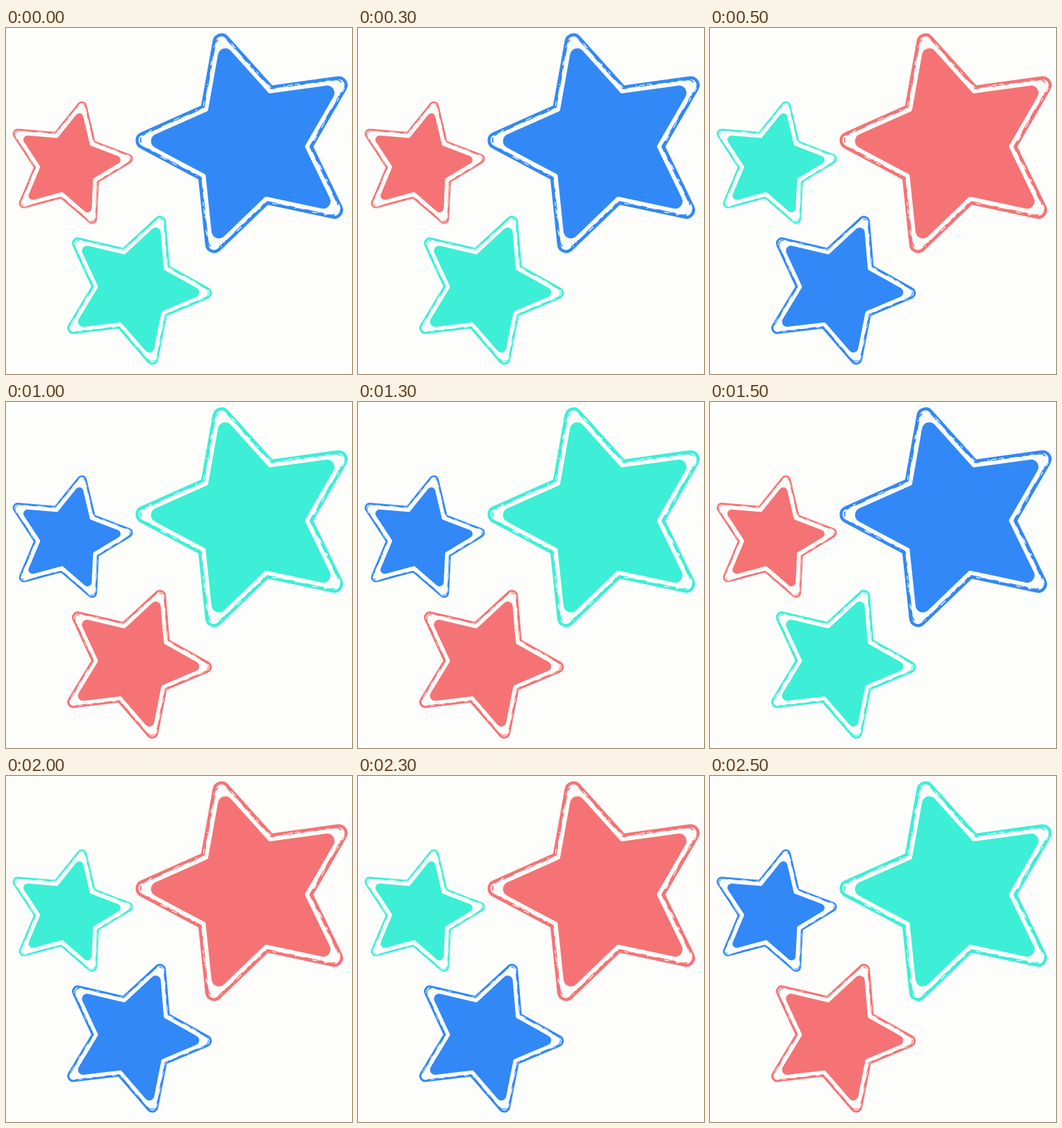
Recreate the animation shown at these times as an HTML page with a canvas. Size 498 px wide and 498 px high, loop 3 s.

```html
<!DOCTYPE html>
<html lang="en">
<head>
<meta charset="utf-8">
<title>Three stars</title>
<style>
  html, body { margin: 0; height: 100%; overflow: hidden; background: #fdfefc; }
  canvas { display: block; }
</style>
</head>
<body>
<canvas width="498" height="498"></canvas>
<script>
const ctx = document.querySelector('canvas').getContext('2d');
const PAPER = '#fdfefc';
const COLORS = ['#3288f6', '#f57375', '#3cefd6'];
const STEP = 500;
const NOTCH = 0.497; // notch radius relative to tip radius

// outer and inner are the tip radii before rounding
const STARS = [
  { x: 352, y: 167.5, outer: 177, inner: 157, tilt: 182.1 },
  { x: 90.2, y: 196, outer: 99, inner: 82.5, tilt: -5.2 },
  { x: 184, y: 375.6, outer: 120, inner: 103.5, tilt: 3.2 },
];

function seededRandom(seed) {
  return () => (seed = seed * 16807 % 2147483647) / 2147483647;
}

function starPath(radius, corner) {
  const path = new Path2D();
  const point = i => {
    const r = i % 2 ? radius * NOTCH : radius;
    const angle = i * Math.PI / 5;
    return [r * Math.cos(angle), r * Math.sin(angle)];
  };
  const [ax, ay] = point(0), [bx, by] = point(9);
  path.moveTo((ax + bx) / 2, (ay + by) / 2);
  for (let i = 0; i < 10; i++) {
    path.arcTo(...point(i), ...point(i + 1), i % 2 ? corner / 4 : corner);
  }
  path.closePath();
  return path;
}

function stroke(path, color, width, dash = []) {
  ctx.strokeStyle = color;
  ctx.lineWidth = width;
  ctx.setLineDash(dash);
  ctx.stroke(path);
}

function drawStar({ x, y, outer, inner, tilt }, color) {
  const corner = outer * 0.06;
  const line = outer * 0.025;
  const random = seededRandom(Math.round(outer));
  const dashes = (on, off) => Array.from({ length: 40 },
    (_, i) => 1 + random() * (i % 2 ? off : on));
  const roughEdge = starPath(outer * 0.972, corner);

  ctx.save();
  ctx.translate(x, y);
  ctx.rotate(tilt * Math.PI / 180);
  ctx.fillStyle = color;
  ctx.fill(starPath(inner, corner));
  stroke(starPath(outer, corner), color, line);
  // Dry-brush texture on the inner side of the line
  stroke(roughEdge, color, line * 0.4, dashes(18, 16));
  stroke(starPath(outer * 0.985, corner), PAPER, line * 0.25, dashes(9, 40));
  ctx.restore();
}

function draw() {
  const step = Math.floor(performance.now() / STEP);
  ctx.fillStyle = PAPER;
  ctx.fillRect(0, 0, 498, 498);
  STARS.forEach((star, i) => drawStar(star, COLORS[(step + i) % 3]));
  requestAnimationFrame(draw);
}
draw();
</script>
</body>
</html>
```
